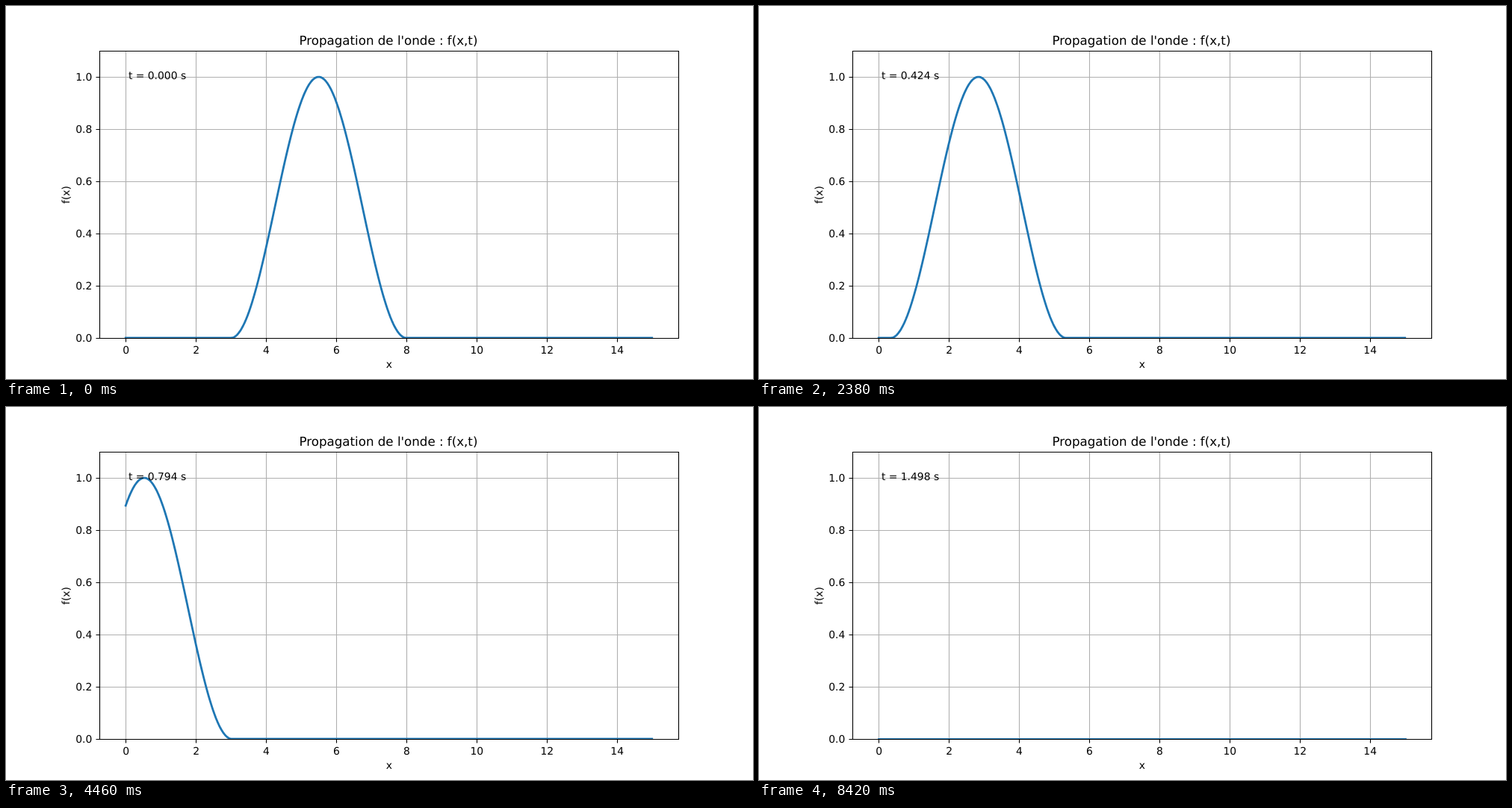
Animation of 1000 by 500 pixels, one loop 8460 ms. Source, as an HTML page:

```html
<!DOCTYPE html>
<html lang="fr">
<head>
<meta charset="utf-8">
<title>Propagation de l'onde</title>
<style>
  html, body { margin: 0; width: 100%; height: 100%; overflow: hidden; background: #fff; }
  svg { display: block; width: 1000px; height: 500px; }
  text { font: 13.889px "DejaVu Sans", sans-serif; fill: #000; white-space: pre; text-rendering: geometricPrecision; }
  .title { font-size: 16.667px; }
  .mid { text-anchor: middle; }
  .end { text-anchor: end; }
  path { fill: none; stroke-width: 1.111; }
  #grid { stroke: #b0b0b0; }
  #frame { stroke: #000; }
  #wave { stroke: #1f77b4; stroke-width: 2.778; stroke-linecap: square; stroke-linejoin: round; }
</style>
</head>
<body>
<svg viewBox="0 0 1000 500">
  <clipPath id="area"><rect x="125" y="60" width="775" height="385"/></clipPath>
  <g clip-path="url(#area)">
    <path id="grid"/>
    <path id="wave"/>
  </g>
  <path id="frame"/>
  <g id="labels"></g>
  <text class="title mid" x="512" y="52">Propagation de l'onde : f(x,t)</text>
  <text class="mid" x="512.8" y="485">x</text>
  <text class="mid" transform="translate(85 253) rotate(-90)">f(x)</text>
  <text id="clock" x="163.9" y="98"></text>
</svg>
<script>
  const FPS = 26, LOOP = 8460;
  const LENGTH = 15, CELLS = 350, DX = LENGTH / CELLS;
  const DT = DX / Math.sqrt(9.81 * 4);   // shallow-water speed, depth 4

  const el = id => document.getElementById(id);
  const px = x => 125 + 775 * (x + 0.75) / 16.5;
  const py = y => 445 - 350 * y;
  const snap = v => Math.floor(v + 0.5) + 0.5;

  function drawAxes() {
    let grid = "", frame = "M125.5 60.5H900.5V445.5H125.5Z", labels = "";
    for (let v = 0; v <= 14; v += 2) {
      const x = snap(px(v));
      grid += `M${x} 60V445`;
      frame += `M${x} 445.5V450.5`;
      labels += `<text class="mid" x="${px(v) + 0.4}" y="466">${v}</text>`;
    }
    for (let i = 0; i <= 5; i++) {
      const y = snap(py(i / 5));
      grid += `M125 ${y}H900`;
      frame += `M125.5 ${y}H120.5`;
      labels += `<text class="end" x="115.3" y="${y + 4.5}">${(i / 5).toFixed(1)}</text>`;
    }
    el("grid").setAttribute("d", grid);
    el("frame").setAttribute("d", frame);
    el("labels").innerHTML = labels;
  }

  const pulse = x => x > 3 && x < 8 ? Math.sin(Math.PI * (x - 3) / 5) ** 2 : 0;

  function wavePath(step) {
    // once the pulse has left, the flat line sits on the pixel grid
    if (step * DX >= 8) return `M${snap(px(0))} 445.5H${snap(px(LENGTH))}`;
    const points = [];
    for (let i = 0; i <= CELLS; i++) {
      const y = pulse((i + step) * DX);
      points.push(px(i * DX).toFixed(3) + " " + py(y).toFixed(3));
    }
    return "M" + points.join("L");
  }

  let shown = -1;
  function draw(ms) {
    const tick = Math.floor((ms % LOOP) / 10);   // delays are whole hundredths
    const step = Math.floor((tick + 0.5) * FPS / 100);
    if (step === shown) return;
    shown = step;
    el("wave").setAttribute("d", wavePath(step));
    el("clock").textContent = `t = ${(step * DT).toFixed(3)} s`;
  }

  drawAxes();
  draw(0);
  let start;
  requestAnimationFrame(function loop(now) {
    start ??= now;
    draw(now - start);
    requestAnimationFrame(loop);
  });
</script>
</body>
</html>
```
